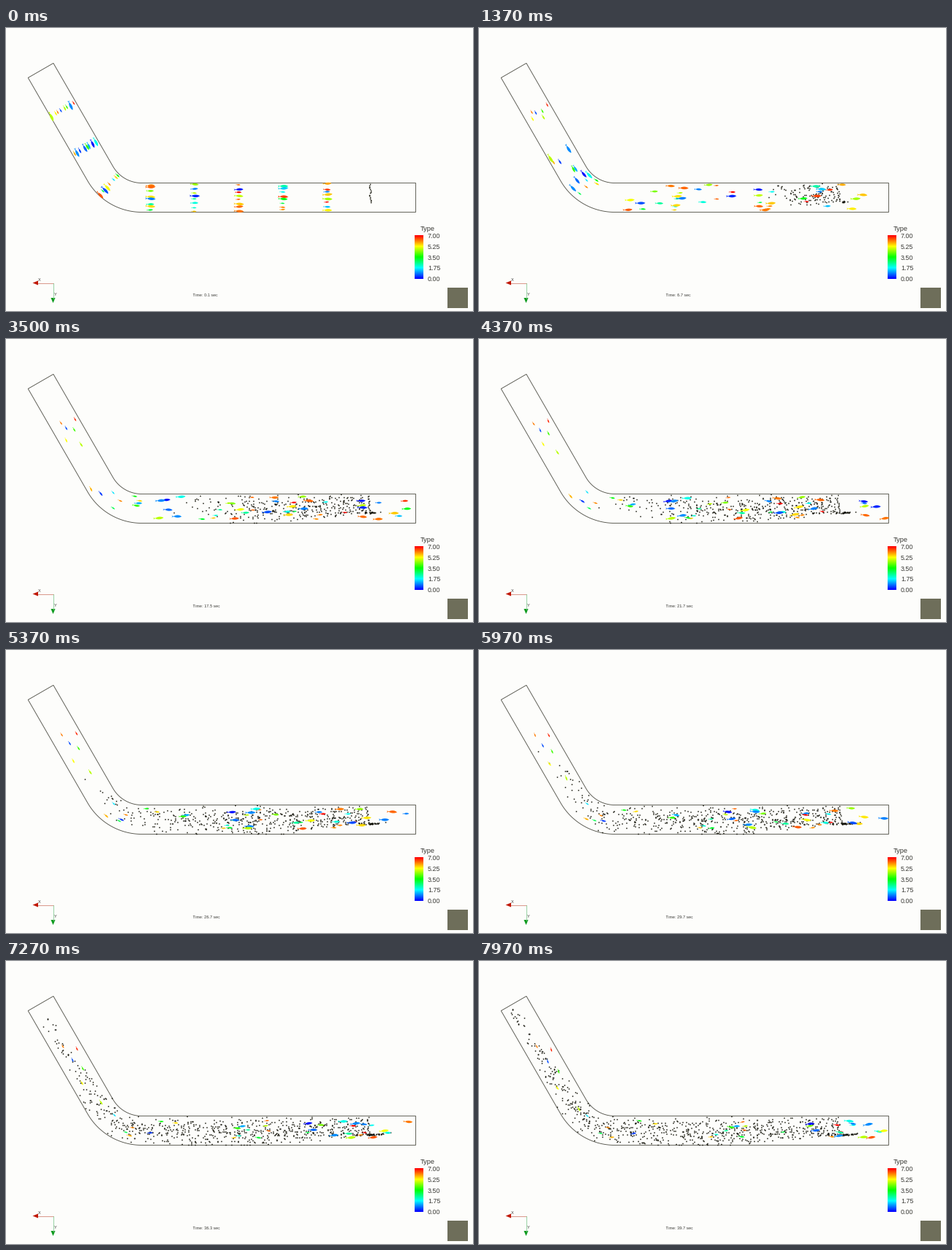
A matplotlib script for the animation above (8 s loop, 640 px wide and 388 px high).

```python
import colorsys

import matplotlib.pyplot as plt
import numpy as np
from matplotlib.animation import FuncAnimation
from matplotlib.collections import PolyCollection
from matplotlib.patches import Polygon, Rectangle

W, H, DPI = 640, 388, 100
FRAMES, LOOP = 240, 8000
INLET, OUTLET, SEED_X = 561.5, -46, 500
PAPER, EDGE, INK = "#fdfdfb", "#55554c", "#3a3a36"
BEND_X, BEND_Y, R_IN, WIDTH, TURN = 186, 167, 45.5, 40, np.pi / 3
R_MID = R_IN + WIDTH / 2
BEND_END = BEND_X - R_MID * TURN
rng = np.random.default_rng(12)


def channel(u, h):
    """Stage position for a distance u along and a share h across the channel."""
    a = np.clip((BEND_X - u) / R_MID, 0, TURN)
    rest = np.maximum(BEND_END - u, 0)
    r = R_IN + WIDTH * h
    x = BEND_X - r * np.sin(a) + np.maximum(u - BEND_X, 0) - rest * np.cos(TURN)
    y = BEND_Y + r * np.cos(a) - rest * np.sin(TURN)
    return x, y, a


def ramp_up(x, start, span):
    return np.clip((x - start) / span, 0, 1)


def hue(value):
    return colorsys.hsv_to_rgb((1 - value / 7) * 2 / 3, 1, 1)


def px(size):
    return size * 72 / DPI


# Swimmers start in eight rows and head upstream at their own pace
ROWS, PER_ROW = 8, 8
fish_n = ROWS * PER_ROW
row, place = np.divmod(np.arange(fish_n), PER_ROW)
u_start = 439 - 60.6 * row
h_start = (place + rng.uniform(.25, .75, fish_n)) / PER_ROW
pace = rng.uniform(0, 14, fish_n)
gain = np.where(row > 5, .25, 0)  # those past the bend pick up speed
length = np.clip(6 + .7 * pace, 6, 14)
phase = rng.uniform(0, 2 * np.pi, fish_n)
fish_colors = np.array([hue(k) for k in rng.uniform(0, 7, fish_n)])

# Unit fish pointing along +x
side = np.linspace(.5, -.3, 8)
girth = .115 * np.sin(np.pi * (side + .3) / .8).clip(0) ** .8 + .012
shape_x = np.concatenate([side, [-.5, -.43, -.5], side[::-1]])
shape_y = np.concatenate([girth, [.1, 0, -.1], -girth[::-1]])

# Drifting grains, released in columns; the lowest one stays near the bed
PER, BURSTS, GAP = 15, 54, .75
count = PER * BURSTS
burst, slot = np.divmod(np.arange(count), PER)
born = burst * GAP
grain_h = .04 + .62 * (slot + rng.uniform(-.3, .3, count)) / (PER - 1)
bed = slot == PER - 1
drift = 16.8 * (1 - .5 * (grain_h / .66) ** 2) * rng.uniform(.6, 1, count)
creep = rng.uniform(-.8, .78, count)
spread, wander = rng.uniform(0, 1, (2, count))


def fish_at(t):
    u = u_start + pace * t * (1 - gain + gain * t / 40)
    h = h_start + (.15 - .4 * h_start) * t / 40
    h = np.clip(h + .02 * np.sin(.9 * t + phase), .03, .97)
    x, y, a = channel(u, h)
    a = a + .15 * np.sin(1.3 * t + phase)
    sway = .1 * np.sin(6 * t + phase)[:, None] * (.5 - shape_x) ** 2
    bx = length[:, None] * shape_x
    by = length[:, None] * (shape_y + sway)
    c, s = np.cos(a)[:, None], np.sin(a)[:, None]
    verts = np.stack([x[:, None] + bx * c - by * s,
                      y[:, None] + bx * s + by * c], axis=2)
    seen = u < INLET - 6
    return verts[seen], fish_colors[seen]


def grains_at(t):
    age = t - born
    live = np.maximum(age, 0)
    trip = drift * live + .8 * np.sin(slot * .9)
    h = grain_h + .5 * spread ** 1.5 * ramp_up(trip, 0, 150)
    h = h + .05 * np.sin(.5 * live + 6.3 * wander) * ramp_up(trip, 0, 80)
    h = h + (.5 + .42 * wander - h) * .75 * ramp_up(trip, 390, 90)
    bed_u = SEED_X + creep * live
    rise = ramp_up(bed_u, SEED_X, 30) ** 2
    u = np.where(bed, bed_u, SEED_X - trip)
    h = np.where(bed, .62 + .04 * spread - .1 * rise, np.clip(h, .02, .98))
    x, y, _ = channel(u, h)
    seen = (age >= 0) & (u > OUTLET + 3)
    return x[seen], y[seen]


fig = plt.figure(figsize=(W / DPI, H / DPI), dpi=DPI, facecolor=PAPER)
ax = fig.add_axes([0, 0, 1, 1])


def label(x, y, text, size):
    return ax.text(x, y, text, fontsize=px(size), color=INK,
                   va="center_baseline", family="Liberation Sans")


# Colour scale
scale = np.array([[hue(v)] for v in np.linspace(7, 0, 60)])
ax.imshow(scale, extent=(560, 572, 344, 284), aspect="auto",
          interpolation="nearest")
label(568, 275, "Type", 9.2)
for i in range(5):
    label(578, 284.3 + 14.9 * i, f"{7 - 1.75 * i:.2f}", 8.9)

# Axis arrows
ax.plot([44, 64.5], [349.5, 349.5], color="#d08070", lw=px(.8))
ax.plot([64.5, 64.5], [349.5, 371], color="#80c890", lw=px(.8))
ax.add_patch(Polygon([(36.5, 349.5), (44, 346.5), (44, 352.5)],
                     fc="#c01808", lw=0))
ax.add_patch(Polygon([(64.5, 377), (61.5, 370), (67.5, 370)],
                     fc="#0b9a1c", lw=0))
label(44, 345, "X", 5.5)
label(65.5, 365, "Y", 5.5)

ax.add_patch(Rectangle((605, 356), 28, 28, fc="#6e6e5a", lw=0))

# Channel walls
along = np.concatenate([[INLET], np.linspace(BEND_X, BEND_END, 40), [OUTLET]])
top, bottom = (np.column_stack(channel(along, h)[:2]) for h in (0, 1))
ax.add_patch(Polygon(np.vstack([top, bottom[::-1]]), fill=False, ec=EDGE,
                     lw=px(.9)))

fish = PolyCollection([], linewidths=0, zorder=4)
ax.add_collection(fish)
grains, = ax.plot([], [], "s", ms=px(1.5), mfc="#101006", mew=0, zorder=3)
clock = label(256, 365.5, "", 5.6)

ax.set_xlim(0, W)
ax.set_ylim(H, 0)
ax.axis("off")


def update(n):
    # the clock ticks 0.2 s, five times in six frames
    t = .1 + .2 * max(0, int(np.floor(n * 5 / 6 - .5)))
    verts, colors = fish_at(t)
    fish.set_verts(verts)
    fish.set_facecolor(colors)
    grains.set_data(*grains_at(t))
    clock.set_text(f"Time: {t:.1f} sec")
    return fish, grains, clock


anim = FuncAnimation(fig, update, frames=FRAMES, interval=LOOP / FRAMES,
                     repeat=True, repeat_delay=0, blit=False)
plt.show()
```
